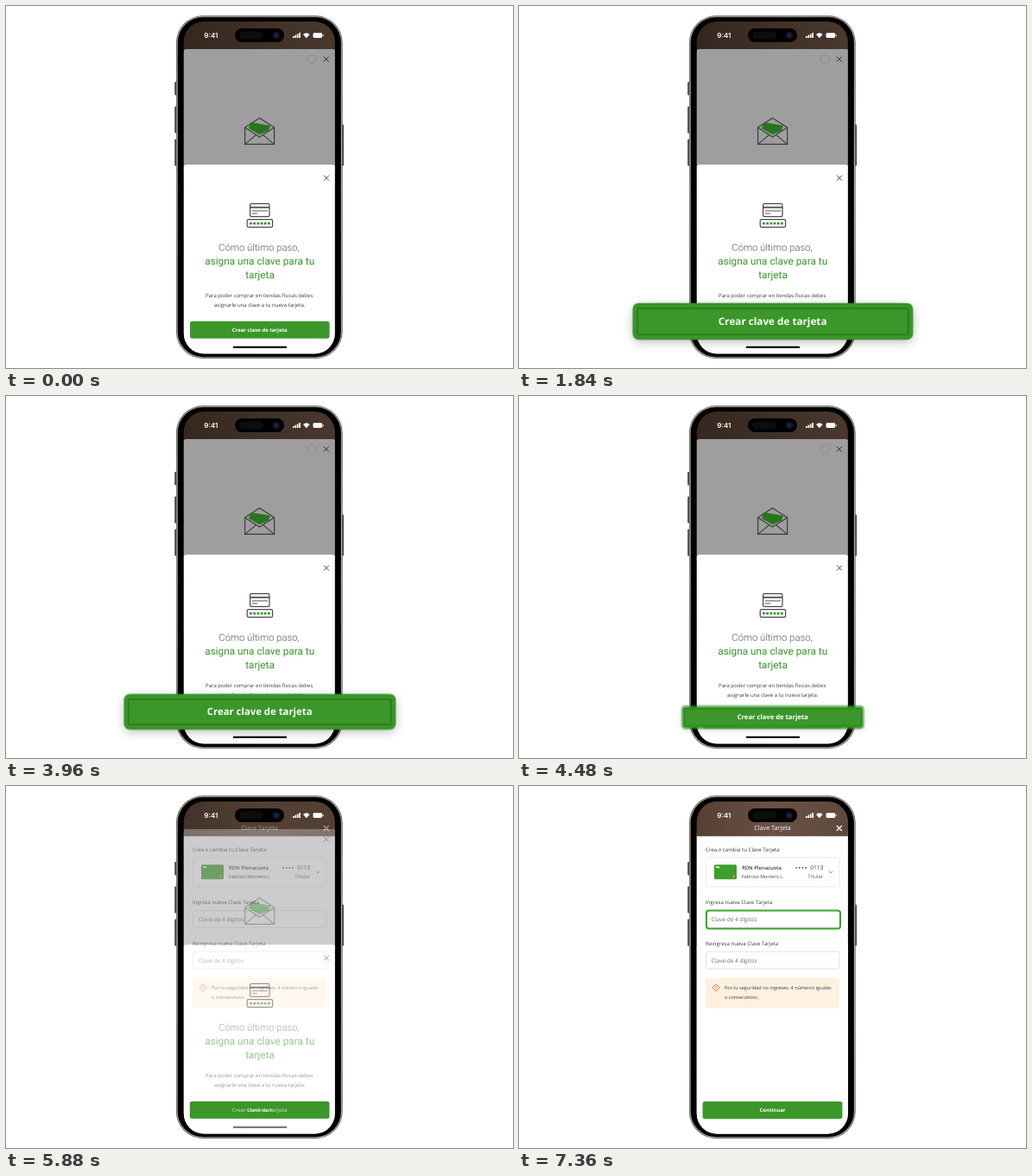
Animation of 587 by 420 pixels, one loop 8 s. Source, as an HTML page:

```html
<!DOCTYPE html>
<html lang="es">
<head>
<meta charset="utf-8">
<title>Clave de tarjeta</title>
<style>
html, body { margin: 0; width: 100%; height: 100%; overflow: hidden; background: #fff; }
svg { display: block; width: 100vw; height: 100vh; }
text { font-family: "Open Sans", "Noto Sans", sans-serif; font-size: 6px; fill: #3a3a3e; text-rendering: geometricPrecision; }
.mid { text-anchor: middle; }
.end { text-anchor: end; }
.title { font-family: Roboto, "Open Sans", sans-serif; font-size: 11.8px; fill: #36952a; }
.title.thin { font-weight: 300; font-size: 11.3px; fill: #58585c; }
.label { font-size: 6.1px; }
.hint { font-size: 6.5px; fill: #6c6c72; }
.note { font-size: 5.53px; }
.cta { font-size: 5.95px; font-weight: 700; fill: #fff; text-anchor: middle; }
.green { fill: #3b9729; }
.line { fill: none; stroke: #47474a; stroke-width: 1.2; stroke-linejoin: round; }
.field { fill: #fff; stroke: #dcdee6; stroke-width: .9; }

.next, .pop, .trace, .mark { animation: 8s linear infinite; }
.next { animation-name: fade; }
.trace { fill: none; stroke-dasharray: 100 100; animation-name: trace; }
.mark { fill: none; stroke: #3ba32b; stroke-width: 2; stroke-dasharray: 100 100; animation-name: mark; }
.pop { transform-origin: 293.7px 375.7px; animation-name: pop, show; animation-timing-function: linear, step-end; }
.halo { animation: halo 8s linear infinite; }
.shade { animation: shade 8s linear infinite; }

@keyframes trace { 0%, 8% { stroke-dashoffset: 100; } 19%, 100% { stroke-dashoffset: 0; } }
@keyframes show { 0% { visibility: hidden; } 8% { visibility: visible; } 59%, 100% { visibility: hidden; } }
@keyframes pop {
  0%, 18.5% { transform: none; }
  23.75% { transform: translateY(-11.6px) scale(2.13); }
  29%, 49% { transform: translateY(-9.9px) scale(1.96); }
  59%, 100% { transform: none; }
}
@keyframes shade { 0%, 18.5% { opacity: 0; } 22%, 52% { opacity: .3; } 59%, 100% { opacity: 0; } }
@keyframes halo { 0%, 54% { opacity: 1; } 59%, 100% { opacity: 0; } }
@keyframes fade {
  0%, 67% { opacity: 0; animation-timing-function: cubic-bezier(.6, 0, 1, .8); }
  75.5%, 100% { opacity: 1; }
}
@keyframes mark {
  0%, 80% { stroke-dashoffset: 100; }
  90.5% { stroke-dashoffset: 6; }
  92%, 100% { stroke-dashoffset: 0; }
}
</style>
</head>
<body>
<svg viewBox="0 0 587 420" preserveAspectRatio="none">
  <defs>
    <clipPath id="screen"><rect x="205.8" y="18" width="175" height="385.6" rx="23.5"/></clipPath>
    <linearGradient id="dim">
      <stop offset="0" stop-color="#35271f"/><stop offset=".5" stop-color="#403027"/><stop offset="1" stop-color="#4a382d"/>
    </linearGradient>
    <linearGradient id="wood">
      <stop offset="0" stop-color="#553f33"/><stop offset=".5" stop-color="#6a5245"/><stop offset="1" stop-color="#5e483c"/>
    </linearGradient>
    <linearGradient id="rim" x2="0" y2="1">
      <stop offset="0" stop-color="#9c978c"/><stop offset=".5" stop-color="#b9b4a8"/><stop offset="1" stop-color="#a5a095"/>
    </linearGradient>
    <filter id="soft" x="-20%" y="-80%" width="140%" height="260%"><feGaussianBlur stdDeviation="3.3"/></filter>
    <filter id="edge" x="-10%" y="-40%" width="120%" height="180%"><feGaussianBlur stdDeviation=".25"/></filter>
    <path id="x" d="M-3 -3 3 3M3 -3-3 3" fill="none"/>
  </defs>

  <!-- phone body -->
  <g fill="#4b4843">
    <rect x="195.2" y="88" width="3" height="15.5" rx="1"/>
    <rect x="195.2" y="116.5" width="3" height="31" rx="1"/>
    <rect x="195.2" y="154.5" width="3" height="31" rx="1"/>
    <rect x="388" y="137.5" width="3" height="48" rx="1"/>
  </g>
  <rect x="197" y="11.3" width="192.6" height="397.6" rx="31" fill="#45423d"/>
  <rect x="198.1" y="12.4" width="190.4" height="395.4" rx="30" fill="#000" stroke="url(#rim)" stroke-width="1.3"/>

  <g clip-path="url(#screen)">
    <!-- last step sheet -->
    <rect x="205" y="17" width="177" height="388" fill="url(#dim)"/>
    <path d="M205 190V54q0-4 4-4h169q4 0 4 4v136z" fill="#9e9e9e"/>
    <circle cx="354" cy="61.5" r="5" fill="none" stroke="#858585" stroke-width=".7"/>
    <use href="#x" x="370.8" y="61.7" stroke="#2c2c2c"/>
    <g class="line" style="stroke:#3c3c3c">
      <path d="M276.6 141 293.5 130 310.6 141V160.4H276.6z"/>
      <path d="M276.6 141 293.5 152 310.6 141M276.6 160.4 289.5 149.6M310.6 160.4 297.6 149.6"/>
      <path d="M283.5 135 306 138.8 304 144.6 293.5 149.2 281 142z" fill="#27751c" stroke="none"/>
    </g>
    <path d="M205 405V189q0-5 5-5h167q5 0 5 5v216z" fill="#fff"/>
    <use href="#x" x="371" y="199.5" stroke="#444"/>
    <g class="line">
      <rect x="282.6" y="229.4" width="22.4" height="15" rx="1.6"/>
      <path d="M282.6 233.6H305" stroke-width="1.7"/>
      <path d="M285 237.8H303M285 240.8H291" stroke-width=".9"/>
      <rect x="279.2" y="247.7" width="29.4" height="9" rx="1.8"/>
      <path d="M282 252.2H306" stroke="#36952a" stroke-width="2.4" stroke-dasharray="2.8 1.4"/>
    </g>
    <text class="title thin mid" x="293" y="284">Cómo último paso,</text>
    <text class="title mid" x="293.7" y="300.2">asigna una clave para tu</text>
    <text class="title mid" x="294" y="316.3">tarjeta</text>
    <text class="mid" x="293.2" y="337.7">Para poder comprar en tiendas físicas debes</text>
    <text class="mid" x="293.7" y="348.6">asignarle una clave a tu nueva tarjeta.</text>
    <rect class="green" x="213" y="365.7" width="161.6" height="20" rx="2.6"/>
    <text class="cta" x="293.7" y="377.8">Crear clave de tarjeta</text>
    <rect x="262.8" y="394.7" width="62.4" height="2.3" rx="1.1"/>

    <!-- new code form -->
    <g class="next">
      <rect x="205" y="17" width="177" height="388" fill="#fff"/>
      <rect x="205" y="17" width="177" height="41.3" fill="url(#wood)"/>
      <text class="mid" x="293.5" y="51.4" style="font-size:7.2px;fill:#fff">Clave Tarjeta</text>
      <use href="#x" x="370.8" y="49" stroke="#fff" stroke-width="1.2"/>

      <text class="label" x="216" y="75.6">Crea o cambia tu Clave Tarjeta</text>
      <rect class="field" x="216.4" y="83" width="154.6" height="33.8" rx="2.5" style="stroke:#e8e8ec"/>
      <rect x="226" y="91.3" width="26" height="17" rx="1.5" fill="#3d9f2c"/>
      <rect x="228" y="93.2" width="4" height="2" fill="#d9efd4"/>
      <circle cx="248.8" cy="105" r="1.7" fill="#e08a2e"/>
      <text x="258" y="97.3" style="font-weight:600;font-size:5.9px">RDN Plenacuota</text>
      <text x="258" y="107.2" style="font-size:5.4px">Fabricio Montero L.</text>
      <path d="M321 94.8h13" stroke="#3a3a3e" stroke-width="1.8" stroke-linecap="round" stroke-dasharray="0 3.7"/>
      <text class="end" x="352.3" y="97" style="font-size:6.6px">0113</text>
      <text class="end" x="352.3" y="107" style="fill:#5a5a60">Titular</text>
      <path d="M358.8 98.8 361 101 363.2 98.8" fill="none" stroke="#77777d" stroke-width=".8"/>

      <text class="label" x="216" y="137.4">Ingresa nueva Clave Tarjeta</text>
      <rect class="field" x="216.5" y="144.6" width="154.5" height="19.8" rx="2.5"/>
      <text class="hint" x="222.8" y="156.8">Clave de 4 dígitos</text>
      <path class="mark" pathLength="100" d="M372 162.6q0 3-3 3H220q-3 0-3-3V147.6q0-3 3-3H369q3 0 3 3z"/>

      <text class="label" x="216" y="185.2">Reingresa nueva Clave Tarjeta</text>
      <rect class="field" x="216.5" y="192.2" width="154.5" height="19.8" rx="2.5"/>
      <text class="hint" x="222.8" y="204.5">Clave de 4 dígitos</text>

      <rect x="216" y="222.4" width="155" height="35" rx="2.5" fill="#fff1e0"/>
      <g fill="none" stroke="#e2683c" stroke-width=".9">
        <path d="M228 229.8 232.2 234 228 238.2 223.8 234z" stroke-linejoin="round"/>
        <path d="M228 232v2.4M228 235.2v.8"/>
      </g>
      <text class="note" x="238" y="236.2">Por tu seguridad no ingreses: 4 números iguales</text>
      <text class="note" x="238" y="246.8">o consecutivos.</text>

      <rect class="green" x="212.6" y="366" width="161.8" height="20.2" rx="2.6"/>
      <text class="cta" x="293.5" y="378.3">Continuar</text>
    </g>
  </g>

  <!-- status bar -->
  <rect x="265" y="26" width="57" height="16" rx="8"/>
  <rect x="270" y="29.5" width="28" height="9" rx="4.5" fill="#0d0d0d"/>
  <circle cx="312.8" cy="34" r="4.2" fill="#14142c"/>
  <circle cx="312.8" cy="34" r="1.6" fill="#27275a"/>
  <text x="229.3" y="37" style="font-family:Inter,sans-serif;font-weight:600;font-size:8px;fill:#fff">9:41</text>
  <g fill="#fff">
    <path d="M332 35h1.7v2h-1.7zM334.4 33.8h1.7v3.2h-1.7zM336.8 32.4h1.7v4.6h-1.7zM339.2 31h1.7v6h-1.7z"/>
    <path d="M344 33q3.8-3.6 7.6 0L347.8 37.2z"/>
    <rect x="355.5" y="31.3" width="10.6" height="5.6" rx="1.4"/>
    <rect x="366.6" y="33" width="1" height="2.2" rx=".5"/>
  </g>

  <!-- button that pops out -->
  <g class="pop">
    <rect class="shade" x="212" y="367.5" width="163.6" height="20" rx="3" filter="url(#soft)"/>
    <g class="halo">
      <path class="trace" pathLength="100" filter="url(#edge)" stroke="#38942a" stroke-width="3.2"
        d="M372.2 366.5q2.4 0 2.4 2.4V382.6q0 2.4-2.4 2.4H215.4q-2.4 0-2.4-2.4V368.9q0-2.4 2.4-2.4z"/>
    </g>
    <rect class="green" x="213" y="366.5" width="161.6" height="18.5" rx="2.4"/>
    <g class="halo">
      <path class="trace" pathLength="100" filter="url(#edge)" stroke="#28751c" stroke-width=".8"
        d="M372.3 368q1 0 1 1V382.5q0 1-1 1H215.3q-1 0-1-1V369q0-1 1-1z"/>
    </g>
    <text class="cta" x="293.7" y="377.8">Crear clave de tarjeta</text>
  </g>
</svg>
</body>
</html>
```
